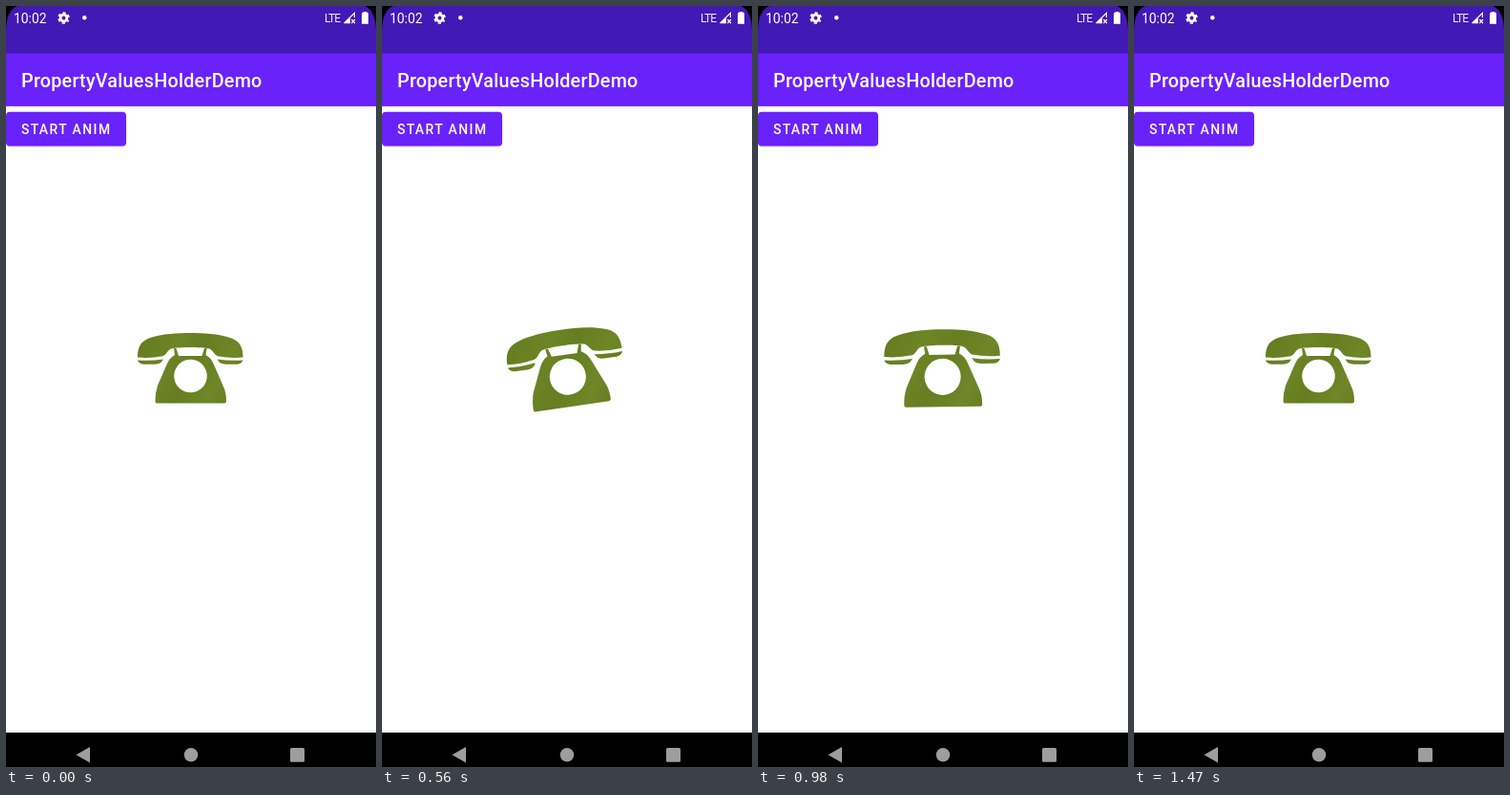
An HTML page that plays this animation: 388x796 px, repeating every 1750 ms.

```html
<!DOCTYPE html>
<html lang="en">
<head>
<meta charset="utf-8">
<title>PropertyValuesHolderDemo</title>
<style>
  html, body { margin: 0; width: 100%; height: 100%; overflow: hidden; background: #fff; }
  svg { display: block; width: 388px; height: 796px; }
  text { font-family: Roboto, sans-serif; fill: #fff; }
  .medium { font-weight: 500; }
</style>
</head>
<body>
<svg viewBox="0 0 388 796">
  <defs>
    <clipPath id="buttonShape"><rect y="110.8" width="126" height="35.6" rx="4"/></clipPath>
    <linearGradient id="olive" gradientUnits="userSpaceOnUse" x1="138" y1="350" x2="248" y2="410">
      <stop stop-color="#647b20"/>
      <stop offset=".3" stop-color="#6d8525"/>
      <stop offset=".5" stop-color="#667d21"/>
      <stop offset=".75" stop-color="#6f8727"/>
      <stop offset="1" stop-color="#627820"/>
    </linearGradient>
  </defs>

  <!-- status and app bars -->
  <rect width="388" height="50" fill="#411ab6"/>
  <rect y="49.6" width="388" height="55.3" fill="#6a22fb"/>
  <path d="M0 0H12Q1 4 0 24ZM388 0H376Q387 4 388 24Z"/>
  <text x="8" y="18" font-size="13.9">10:02</text>
  <g transform="translate(60.5 12.5) rotate(30)" fill="none" stroke="#fff">
    <circle r="3.4" stroke-width="2.8"/>
    <circle r="5.2" stroke-width="2.2" stroke-dasharray="2.9 2.545" stroke-dashoffset="1.45"/>
  </g>
  <circle cx="82.3" cy="12.3" r="2.2" fill="#fff"/>
  <text x="334" y="17.2" font-size="12.2" letter-spacing="-1" fill-opacity=".9">LTE</text>
  <path d="M354 18.3 361 11.5V18.3Z" fill="#fff"/>
  <path d="M354.8 17.7 365.4 7.4V12M362.3 14 366 18M366 14 362.3 18" fill="none" stroke="#fff" stroke-width="1.2"/>
  <path d="M374.5 7.3V6H378.5V7.3H380V18.7H373V7.3Z" fill="#fff"/>
  <text class="medium" x="16" y="85" font-size="19.76" letter-spacing=".247">PropertyValuesHolderDemo</text>

  <!-- button -->
  <rect y="111.6" width="126.4" height="35.6" rx="4" opacity=".15"/>
  <g clip-path="url(#buttonShape)">
    <rect y="110" width="126" height="37" fill="#6a22fb"/>
    <rect id="tint" y="110" width="126" height="37" fill="#7d27f5"/>
    <circle id="ripple" cx="62" cy="128.5" fill="#fff"/>
  </g>
  <text class="medium" x="16" y="133.6" font-size="13.9" letter-spacing="1.42">START ANIM</text>

  <!-- telephone -->
  <g id="phone" fill="url(#olive)">
    <path d="M138 367.5C138 357 141 351 150 347.5C165 342.500 180 342 193.250 342C206.500 342 221.500 342.500 236.500 347.500C245.500 351 248.500 357 248.500 367.500Q235.500 368.800 222 366.200C218.500 365 217 360 213.500 358.500C205 356.500 181.500 356.500 173 358.500C169.500 360 168 365 164.500 366.200Q151 368.800 138 367.500Z"/>
    <path id="strip" d="M138 370.500Q151 371.500 165 369.500L162.500 373Q160 374.800 156 374.800H144Q139 374 138 370.500Z"/>
    <use href="#strip" transform="translate(386.5) scale(-1 1)"/>
    <path fill-rule="evenodd" d="M158 415.500Q156.500 415.500 156.500 413Q156.500 404 159 397L169 374Q171.500 368 177 365L176 358H178.500L181 366H205.500L208 358H210.500L209.500 365Q215 368 217.500 374L227.500 397Q231 404 231 413Q231 415.500 229 415.500ZM176.200 387a17.300 17.300 0 1 0 34.600 0a17.300 17.300 0 1 0-34.600 0Z"/>
  </g>

  <!-- navigation bar -->
  <rect y="760" width="388" height="36"/>
  <g fill="#9e9e9e">
    <path d="M73.500 783.300 88 775V791.500Z"/>
    <circle cx="194" cy="783.300" r="7.200"/>
    <rect x="298" y="776" width="15" height="14.800" rx="1.500"/>
  </g>
</svg>
<script>
  const STEP = 70, STEPS = 25;
  const START = 185, DURATION = 1000, STEP_TIME = 1000 / 15;
  const PIVOT = [193.5, 378.5];
  const phone = document.getElementById('phone');
  const tint = document.getElementById('tint');
  const ripple = document.getElementById('ripple');

  const clamp = v => Math.min(1, Math.max(0, v));
  const accelerateDecelerate = p => (1 - Math.cos(Math.PI * p)) / 2;

  // Eleven evenly spaced keys: 0, -20, 20, -20, ... , -20, 0
  const key = i => i <= 0 || i >= 10 ? 0 : i % 2 ? -20 : 20;

  function ring(elapsed) {
    const pos = accelerateDecelerate(clamp((elapsed - START) / DURATION)) * 10;
    const i = Math.floor(pos);
    const angle = key(i) + (key(i + 1) - key(i)) * (pos - i);
    const scale = 1 + 0.1 * Math.min(1, pos, 10 - pos);
    phone.setAttribute('transform',
      `translate(${PIVOT}) rotate(${angle}) scale(${scale}) translate(${-PIVOT[0]} ${-PIVOT[1]})`);
  }

  function press(step) {
    const active = step >= 2 && step <= 6;
    tint.setAttribute('opacity', active ? 0.8 : 0);
    ripple.setAttribute('r', Math.max(0, 26 + (step - 2) * 32));
    ripple.setAttribute('opacity', active ? clamp(0.2 - Math.max(0, step - 3) * 0.066) : 0);
  }

  function draw(now) {
    const step = Math.floor(now / STEP) % STEPS;
    ring(step * STEP_TIME);
    press(step);
    requestAnimationFrame(draw);
  }
  draw(0);
</script>
</body>
</html>
```
